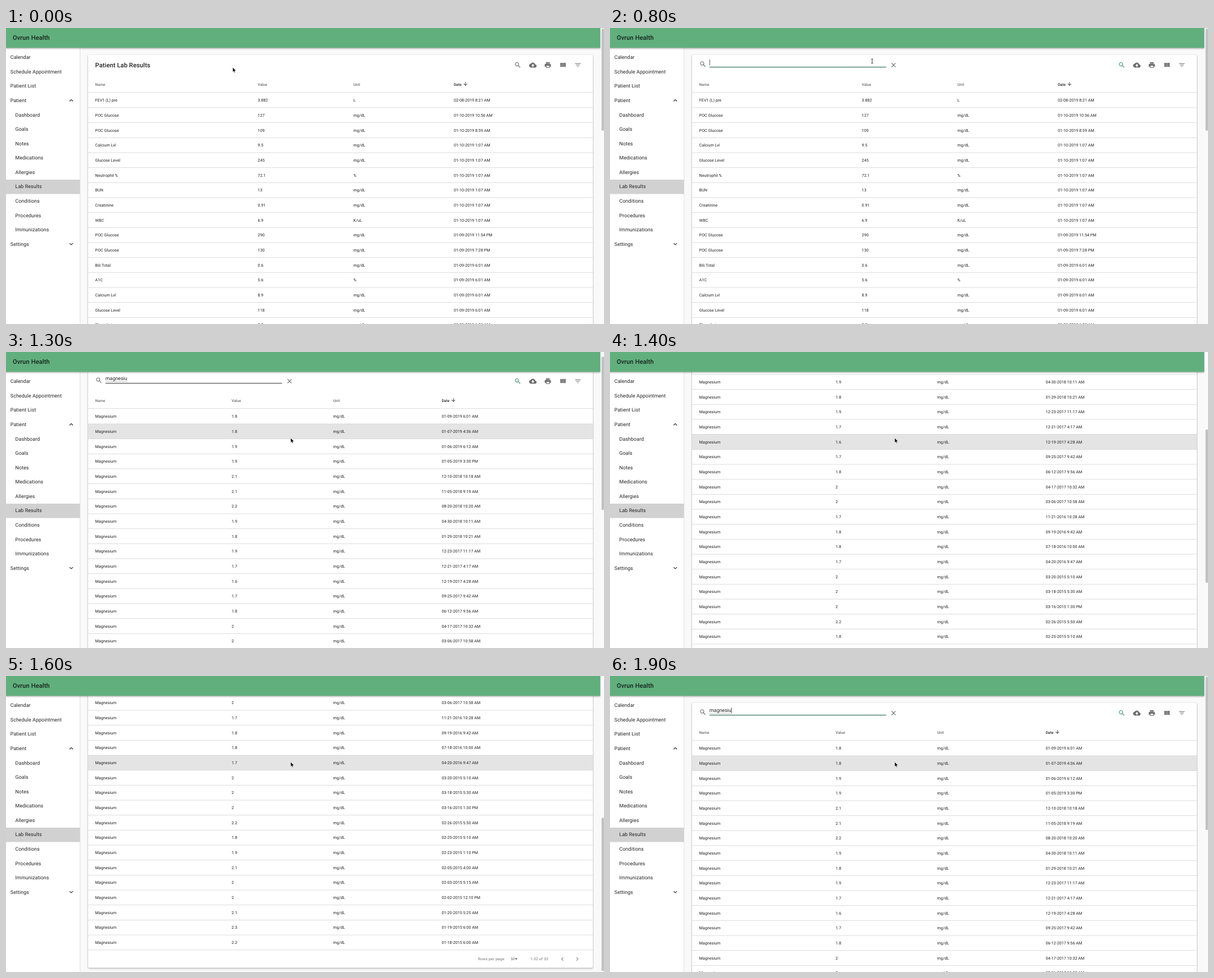
An HTML page for the animation above (2 s loop, 1063 by 527 pixels).

```html
<!DOCTYPE html>
<html lang="en">
<head>
<meta charset="utf-8">
<title>Patient Lab Results</title>
<style>
  html, body { margin: 0; width: 100%; height: 100%; overflow: hidden; background: #f9f9f9; }
  svg { display: block; width: 1063px; height: 527px; }
  text { font-family: Roboto, sans-serif; text-rendering: geometricPrecision; white-space: pre; }
  .card { filter: drop-shadow(0 1px 1.8px rgba(0,0,0,.36)); }
  .bar { filter: drop-shadow(0 1.5px 1.8px rgba(0,0,0,.36)); }
</style>
</head>
<body>
<svg id="stage" viewBox="0 0 1063 527"></svg>
<script>
const ICONS = {
  search: 'M15.5 14h-.79l-.28-.27C15.41 12.59 16 11.11 16 9.5 16 5.91 13.09 3 9.5 3S3 5.91 3 9.5 5.91 16 9.5 16c1.61 0 3.09-.59 4.23-1.57l.27.28v.79l5 4.99L20.49 19l-4.99-5zm-6 0C7.01 14 5 11.99 5 9.5S7.01 5 9.5 5 14 7.01 14 9.5 11.99 14 9.5 14z',
  cloud: 'M19.35 10.04C18.67 6.59 15.64 4 12 4 9.11 4 6.6 5.64 5.35 8.04 2.34 8.36 0 10.91 0 14c0 3.31 2.69 6 6 6h13c2.76 0 5-2.24 5-5 0-2.64-2.05-4.78-4.65-4.96zM17 13l-5 5-5-5h3V9h4v4h3z',
  print: 'M19 8H5c-1.66 0-3 1.34-3 3v6h4v4h12v-4h4v-6c0-1.66-1.34-3-3-3zm-3 11H8v-5h8v5zm3-7c-.55 0-1-.45-1-1s.45-1 1-1 1 .45 1 1-.45 1-1 1zm-1-9H6v4h12V3z',
  columns: 'M10 18h5V5h-5v13zm-6 0h5V5H4v13zM16 5v13h5V5h-5z',
  filter: 'M10 18h4v-2h-4v2zM3 6v2h18V6H3zm3 7h12v-2H6v2z',
  clear: 'M19 6.41L17.59 5 12 10.59 6.41 5 5 6.41 10.59 12 5 17.59 6.41 19 12 13.41 17.59 19 19 17.59 13.41 12z',
  up: 'M12 8l-6 6 1.41 1.41L12 10.83l4.59 4.58L18 14z',
  down: 'M16.59 8.59L12 13.17 7.41 8.59 6 10l6 6 6-6z',
  left: 'M15.41 7.41L14 6l-6 6 6 6 1.41-1.41L10.83 12z',
  right: 'M10 6L8.59 7.41 13.17 12l-4.58 4.59L10 18l6-6z',
  drop: 'M7 10l5 5 5-5z',
  sort: 'M20 12l-1.41-1.41L13 16.17V4h-2v12.17l-5.58-5.59L4 12l8 8 8-8z'
};
const INK = '#222', MUTED = '#6c6c6c', TEAL = '#43917a';
const ROW_TOP = 115.3, ROW_H = 26.67, MAX_SCROLL = 482.4;

const stage = document.getElementById('stage');
function add(parent, tag, attrs = {}, content) {
  const el = document.createElementNS('http://www.w3.org/2000/svg', tag);
  for (const key in attrs) el.setAttribute(key, attrs[key]);
  if (content !== undefined) el.textContent = content;
  return parent.appendChild(el);
}
const group = parent => add(parent, 'g');
const rect = (parent, x, y, width, height, fill, more) =>
  add(parent, 'rect', { x, y, width, height, fill, ...more });
// Text is centred vertically on its capital letters.
const label = (parent, x, y, size, content, fill = INK, weight = 400, spacing = 0) =>
  add(parent, 'text', { x, y: y + size * .355, 'font-size': size, fill,
    'font-weight': weight, 'letter-spacing': spacing * size }, content);
const icon = (parent, name, x, y, size = 13.33, fill = MUTED) =>
  add(parent, 'path', { d: ICONS[name], fill,
    transform: `translate(${x - size / 2} ${y - size / 2}) scale(${size / 24})` });
const line = (parent, y) => rect(parent, 146, y - .4, 897, .8, '#d3d3d3');
const show = (el, visible) => el.setAttribute('display', visible ? 'inline' : 'none');
const move = (el, x, y) => el.setAttribute('transform', `translate(${x} ${y})`);

const allRows = [
  'FEV1 (L) pre|3.882|L|02-08-2019 8:21 AM',
  'POC Glucose|127|mg/dL|01-10-2019 10:56 AM',
  'POC Glucose|109|mg/dL|01-10-2019 8:59 AM',
  'Calcium Lvl|9.5|mg/dL|01-10-2019 1:07 AM',
  'Glucose Level|245|mg/dL|01-10-2019 1:07 AM',
  'Neutrophil %|72.1|%|01-10-2019 1:07 AM',
  'BUN|13|mg/dL|01-10-2019 1:07 AM',
  'Creatinine|0.91|mg/dL|01-10-2019 1:07 AM',
  'WBC|6.9|K/uL|01-10-2019 1:07 AM',
  'POC Glucose|290|mg/dL|01-09-2019 11:54 PM',
  'POC Glucose|130|mg/dL|01-09-2019 7:28 PM',
  'Bili Total|0.6|mg/dL|01-09-2019 6:01 AM',
  'A1C|5.6|%|01-09-2019 6:01 AM',
  'Calcium Lvl|8.9|mg/dL|01-09-2019 6:01 AM',
  'Glucose Level|118|mg/dL|01-09-2019 6:01 AM',
  'Phosphate|2.8|mg/dL|01-09-2019 6:01 AM'
].map(row => row.split('|'));

const values = ('1.8 1.8 1.9 1.9 2.1 2.1 2.2 1.9 1.8 1.9 1.7 1.6 1.7 1.8 2 2 ' +
  '1.7 1.8 1.8 1.7 2 2 2 2.2 1.8 1.9 2.1 2 2 2.1 2.3 2.2').split(' ');
const dates = [
  [2019, '01-09 6:01 AM,01-07 4:36 AM,01-06 6:12 AM,01-05 3:30 PM'],
  [2018, '12-10 10:18 AM,11-05 9:19 AM,08-20 10:20 AM,04-30 10:11 AM,01-29 10:21 AM'],
  [2017, '12-23 11:17 AM,12-21 4:17 AM,12-19 4:28 AM,09-25 9:42 AM,06-12 9:56 AM,04-17 10:32 AM,03-06 10:58 AM'],
  [2016, '11-21 10:28 AM,09-19 9:42 AM,07-18 10:00 AM,04-20 9:47 AM'],
  [2015, '03-20 5:10 AM,03-18 5:30 AM,03-16 1:30 PM,02-26 5:50 AM,02-25 5:10 AM,02-23 1:10 PM,' +
    '02-05 4:00 AM,02-03 5:15 AM,02-02 12:10 PM,01-20 5:25 AM,01-19 6:00 AM,01-18 6:00 AM']
].flatMap(([year, days]) => days.split(',').map(day => day.replace(' ', `-${year} `)));
const magnesiumRows = dates.map((date, i) => ['Magnesium', values[i], 'mg/dL', date]);

function table(parent, columns, rows) {
  const g = group(parent);
  ['Name', 'Value', 'Unit', 'Date'].forEach((name, i) =>
    label(g, columns[i], 100.3, 6.67, name, i === 3 ? INK : MUTED, 500));
  icon(g, 'sort', columns[3] + 20.8, 99.5, 10, INK);
  line(g, 114.7);
  rows.forEach((cells, r) => {
    const y = ROW_TOP + r * ROW_H;
    cells.forEach((cell, i) => label(g, columns[i], y + ROW_H / 2, 7.2, cell));
    line(g, y + ROW_H);
  });
  return g;
}

// Scrolling page
const page = group(stage);
const card = rect(page, 146, 48, 897, 952.4, '#fff', { rx: 2.2, class: 'card' });
const hoverRow = rect(page, 146, 0, 897, ROW_H, '#e4e4e4');
const fullTable = table(page, [158.6, 447.6, 617.5, 796], allRows);
const foundTable = table(page, [158.6, 401, 581.5, 774.5], magnesiumRows);

label(foundTable, 839, 984.8, 6.67, 'Rows per page:', MUTED, 400, .0333);
label(foundTable, 897, 984.8, 6.67, '50', MUTED);
icon(foundTable, 'drop', 907, 984.6, 13.33);
label(foundTable, 932, 984.8, 6.67, '1-32 of 32', MUTED, 400, .0333);
icon(foundTable, 'left', 989, 984.8, 13.33, '#8a8a8a');
icon(foundTable, 'right', 1015.5, 984.8, 13.33, '#8a8a8a');

const iconHover = add(page, 'circle', { cx: 909.7, cy: 66, r: 13.3, fill: '#ebebeb' });
const searchButton = icon(page, 'search', 909.7, 66);
['cloud', 'print', 'columns', 'filter'].forEach((name, i) => icon(page, name, 936.5 + i * 26.67, 66));

const title = label(page, 158.6, 66, 11.11, 'Patient Lab Results', INK, 500, .0075);
const searchBox = group(page);
icon(searchBox, 'search', 165.2, 64.5);
icon(searchBox, 'clear', 504, 66);
const underline = rect(searchBox, 176.8, 69, 314, 1.2, '#33705f');
const query = label(searchBox, 176.8, 61.2, 8.89, '');
const spelling = add(searchBox, 'path', { d: 'M177 66.6H215.5', stroke: '#777',
  'stroke-width': .9, 'stroke-dasharray': '1 1' });
const caret = rect(searchBox, 0, 56, .8, 10.5, '#333');

// Fixed sidebar
rect(stage, 0, 30, 131.5, 497, '#fff');
rect(stage, 131.3, 30, .8, 497, '#dcdcdc');
rect(stage, 0, 270, 131.5, 25.6, '#d1d1d1');
['Calendar', 'Schedule Appointment', 'Patient List', 'Patient', ' Dashboard', ' Goals', ' Notes',
  ' Medications', ' Allergies', ' Lab Results', ' Conditions', ' Procedures', ' Immunizations', 'Settings']
  .forEach((name, i) => label(stage, name[0] === ' ' ? 16.6 : 7.8, 52.2 + i * 25.56, 8.89,
    name.trim(), INK, 400, .0094));
icon(stage, 'up', 116, 129, 13.33, INK);
icon(stage, 'down', 116, 384.6, 13.33, INK);

// Fixed top bar and scrollbar
rect(stage, -6, -6, 1062.7, 41.4, '#61af7d', { class: 'bar' });
label(stage, 12, 17.4, 11.11, 'Ovrun Health', '#14231a', 500, .0075);
rect(stage, 1056.7, 0, 6.3, 527, '#fafafa');
const thumb = rect(stage, 1058.6, 0, 4.4, 0, '#c1c1c1', { rx: 2 });

// Pointers
const arrow = add(stage, 'path', { d: 'M0 0V8.4L1.9 6.7 3.2 9.6 4.6 9 3.4 6.2H6Z', fill: '#000',
  stroke: '#fff', 'stroke-width': .6 });
const hand = add(stage, 'path', { d: 'M-1 0Q0-1 .8 0V3.2L4 4Q5 4.3 4.7 5.6L3.8 9H-.6L-3.2 5.6Q-3 4.4-1 5.6Z',
  fill: '#fff', stroke: '#000', 'stroke-width': .7 });
const beam = add(stage, 'path', { d: 'M-1.8-4Q0-4 0-3Q0-4 1.8-4M0-3V3M-1.8 4Q0 4 0 3Q0 4 1.8 4',
  fill: 'none', stroke: '#222', 'stroke-width': .9 });

// Steps of a tenth of a second
const pointerPath = [[403, 70], [455, 69], [640, 67], [850, 66], [909, 64], [909, 64], [909, 64], [690, 62], [466, 59]];
const typed = { 9: 'm', 10: 'magne' };
const scrollSteps = { 13: 14, 14: 262, 15: 470.7, 16: 481, 17: MAX_SCROLL, 18: 215 };

function draw(step) {
  const searching = step >= 5, filtered = step >= 10, reading = step >= 12;
  const scroll = scrollSteps[step] || 0;
  const content = filtered ? 527 + MAX_SCROLL : 1509;
  const [x, y] = reading ? [506, 153] : pointerPath[Math.min(step, 8)];
  const overButton = step >= 4 && step <= 6;
  const overInput = step === 8;

  move(page, 0, -scroll);
  card.setAttribute('height', content - 57);
  show(fullTable, !filtered);
  show(foundTable, filtered);
  show(hoverRow, reading);
  hoverRow.setAttribute('y', ROW_TOP + ROW_H * Math.floor((y + scroll - ROW_TOP) / ROW_H));

  show(title, !searching);
  show(searchBox, searching);
  show(iconHover, overButton);
  searchButton.setAttribute('fill', searching || overButton ? TEAL : MUTED);
  query.textContent = step > 10 ? 'magnesiu' : typed[step] || '';
  show(spelling, reading);
  show(caret, step < 11 || step === 19);
  caret.setAttribute('x', 176.8 + (query.textContent ? query.getComputedTextLength() : 0));
  underline.setAttribute('fill', step === 13 ? '#505050' : '#33705f');

  thumb.setAttribute('y', scroll * 527 / content + 1);
  thumb.setAttribute('height', 527 * 527 / content - 2);

  show(arrow, reading || step < 4 || step === 7);
  show(hand, overButton);
  show(beam, overInput);
  [arrow, hand, beam].forEach(pointer => move(pointer, x, y));
}

const start = performance.now();
function tick() {
  draw(Math.floor((performance.now() - start) % 2000 / 100));
  requestAnimationFrame(tick);
}
tick();
</script>
</body>
</html>
```
